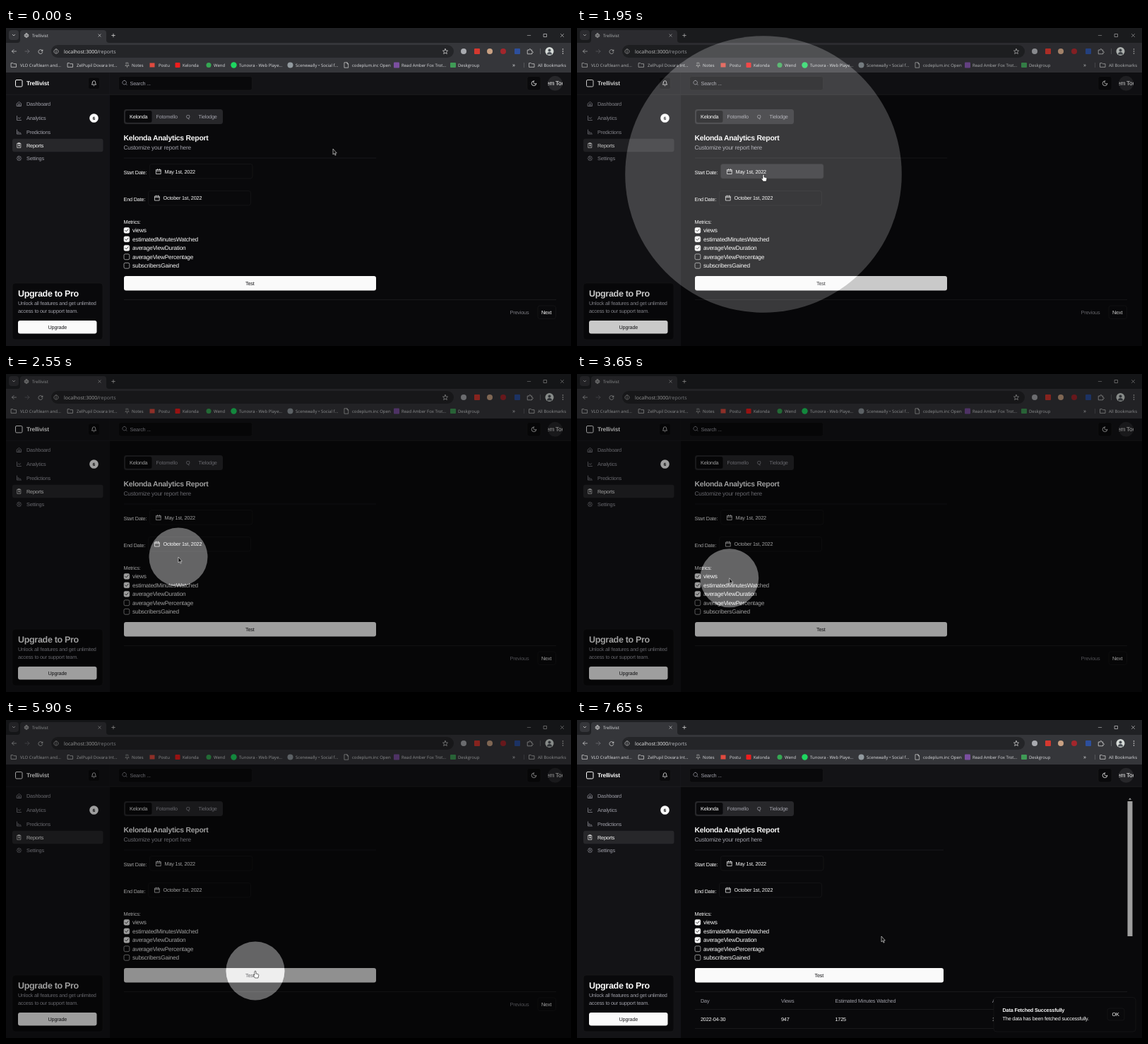
Recreate the animation shown at these times as an HTML page. Size 800 px wide and 450 px high, loop 8 s.

```html
<!DOCTYPE html>
<html lang="en">
<head>
<meta charset="utf-8">
<title>Reports</title>
<style>
html, body { margin: 0; width: 100%; height: 100%; overflow: hidden; background: #09090b; }
svg { display: block; width: 100vw; height: 100vh; }
text { font-family: "Liberation Sans", Arial, sans-serif; letter-spacing: -.025em; white-space: pre; text-rendering: geometricPrecision; }
.ui { font-family: "Open Sans", "Noto Sans", sans-serif; letter-spacing: 0; }
.b { font-weight: bold; }
</style>
</head>
<body>
<svg id="stage" viewBox="0 0 800 450"></svg>
<script>
const WHITE = '#fafafa', MUTED = '#a1a1aa', BG = '#09090b', PANEL = '#131316', HOVER = '#27272a', LINE = '#1b1b1e';
const SM = 7.29, MD = 8.33, LG = 10.42, XL = 12.5;

// Text is placed by its left edge and the middle of its capitals.
const text = (x, y, s, size = SM, fill = WHITE, cls = '') =>
  `<text x="${x}" y="${y + size * .36}" font-size="${size}" fill="${fill}" class="${cls}">${s}</text>`;
const ui = (x, y, s, size = 6, fill = '#dcdde0') => text(x, y, s, size, fill, 'ui');
const box = (x, y, w, h, fill, r = 0, more = '') =>
  `<rect x="${x}" y="${y}" width="${w}" height="${h}" rx="${r}" fill="${fill}" ${more}/>`;
const framed = (x, y, w, h, fill, r, id = '') => box(x, y, w, h, fill, r, `stroke="${LINE}" stroke-width=".6" id="${id}"`);
const dot = (x, y, r, fill) => `<circle cx="${x}" cy="${y}" r="${r}" fill="${fill}"/>`;
const icon = (x, y, size, d, color = WHITE, w = 2) =>
  `<path transform="translate(${x - size / 2} ${y - size / 2}) scale(${size / 24})" d="${d}" fill="none" stroke="${color}" stroke-width="${w}" stroke-linecap="round" stroke-linejoin="round"/>`;
const rule = (x1, y, x2, id = '') => `<path id="${id}" d="M${x1} ${y}H${x2}" stroke="#242427" stroke-width=".6"/>`;

const ICON = {
  home: 'M3 10l9-7 9 7v11H3zM9 21v-9h6v9',
  line: 'M3 3v18h18M19 9l-5 5-4-4-3 3',
  bars: 'M3 3v18h18M8 17v-7M13 17v-3M18 17v-1',
  clip: 'M5 4h14v18H5zM9 2h6v4H9zM12 10v6M9 13h6',
  gear: 'M12 9a3 3 0 1 0 .01 0M12 2l3 3h4v4l3 3-3 3v4h-4l-3 3-3-3H5v-4l-3-3 3-3V5h4z',
  bell: 'M6 8a6 6 0 0 1 12 0c0 7 3 9 3 9H3s3-2 3-9M10.3 21a2 2 0 0 0 3.4 0',
  moon: 'M12 3a6 6 0 0 0 9 9 9 9 0 1 1-9-9',
  search: 'M11 3a8 8 0 1 0 .01 0M21 21l-4.3-4.3',
  date: 'M3 5h18v17H3zM16 2v4M8 2v4M3 10h18',
  folder: 'M2 4h7l3 3h10v13H2z',
  globe: 'M12 2a10 10 0 1 0 .01 0M3 9h18M3 15h18M12 2c-6 6-6 14 0 20c6-6 6-14 0-20',
  star: 'M12 2l3 7 7 .5-5.500 5 2 7.500-6.500-4-6.500 4 2-7.500-5.500-5 7-.5z',
  info: 'M12 2a10 10 0 1 0 .01 0M12 11v6M12 7v.1',
  reload: 'M20 6v5h-5M20 11a8.500 8.500 0 1 0 0 5',
  back: 'M21 12H3M11 4l-8 8 8 8',
  next: 'M3 12h18M13 4l8 8-8 8',
  down: 'M5 9l7 7 7-7',
  cross: 'M4 4l16 16M20 4L4 20',
  plus: 'M12 3v18M3 12h18',
  minus: 'M3 12h18',
  square: 'M4 4h16v16H4z',
  puzzle: 'M3 7h6c-2-6 7-6 5 0h5v6c6-2 6 7 0 5v4H3z',
  pin: 'M8 2h8v8l4 5H4l4-5zM12 15v7',
  file: 'M4 1h11l5 6v16H4zM15 1v6h5',
  check: 'M4 12l6 6L20 6'
};

function browser() {
  const marks = [
    [20, 'VLO Craftlearn and...'], [100, 'ZelPupil Dovara Int...'], [178, 'Notes'], [216, 'Postu'],
    [250, 'Kelonda'], [294, 'Wend'], [330, 'Tunovra - Web Playe...'], [410, 'Scenewally • Social f...'],
    [490, 'codeplum.inc Open'], [560, 'Read Amber Fox Trot...'], [640, 'Deskgroup'], [753, 'All Bookmarks']
  ];
  const ext = [[648, '#a9abb0'], [685, '#c9a183'], [704, '#a3262c']];
  return box(0, 0, 800, 63, '#35363a') + box(0, 0, 800, 21, '#202124') +
    box(4, 3, 14, 14, '#35363a', 4) + icon(11, 10, 6, ICON.down, '#ddd', 3) +
    '<path d="M16 21q4 0 4-4V7q0-4 4-4H138q4 0 4 4V17q0 4 4 4z" fill="#35363a"/>' +
    icon(29, 10.5, 7, ICON.globe, '#ddd') + ui(37, 10.5, 'Trellivist') +
    icon(132.500, 10.5, 5, ICON.cross, '#ddd', 3) + icon(152, 10.5, 6, ICON.plus, '#ddd', 3) +
    icon(740.500, 10.5, 6, ICON.minus, '#ddd') + icon(763.500, 10.5, 6, ICON.square, '#ddd', 2.500) + icon(787.500, 10.5, 6, ICON.cross, '#ddd', 2.500) +
    icon(11.500, 33, 8, ICON.back, '#ddd') + icon(30, 33, 8, ICON.next, '#77787c') + icon(49, 33, 8.500, ICON.reload, '#ddd') +
    box(64, 24, 570, 18, '#242528', 9) + icon(71, 33, 7.500, ICON.info, '#ddd') +
    ui(82, 33, 'localhost:3000/<tspan fill="#b9bbc0">reports</tspan>', 7, '#eee') + icon(622, 33, 8.500, ICON.star, '#ddd') +
    ext.map(e => dot(e[0], 33, 4, e[1])).join('') + box(663, 29, 8, 8, '#d4382f', 1) + box(720, 29, 8, 8, '#2d4f9c', 1) +
    icon(742, 33, 9, ICON.puzzle, '#ddd') + box(756, 29, .7, 8, '#6b6d72') +
    dot(769.500, 33, 6, '#d6dbd8') + dot(769.500, 31.500, 2, '#4a4f55') + '<path d="M766 37.500a3.500 3.500 0 0 1 7 0z" fill="#4a4f55"/>' +
    [30, 33, 36].map(y => dot(788.500, y, .8, '#ddd')).join('') +
    marks.map(m => ui(m[0], 52.500, m[1])).join('') +
    [11, 91, 744.500].map(x => icon(x, 52.500, 8.500, ICON.folder, '#ddd')).join('') +
    icon(171.500, 52.500, 8, ICON.pin, '#aaa') + icon(482, 52.500, 8, ICON.file, '#ddd') +
    box(203.500, 49.500, 7, 6, '#e04a3f') + box(239.500, 49, 7, 7, '#f01d1d', 1) + dot(287, 52.500, 3.500, '#35a853') +
    dot(322.500, 52.500, 4.200, '#1ed760') + dot(402.500, 52.500, 4, '#929a9f') + box(549, 48.500, 8, 8, '#7b4fa0', 1) +
    box(629, 49, 8, 7, '#3f9b56', 1) + ui(717, 52, '»', 8) + box(733, 49, .6, 7, '#6b6d72');
}

function sidebar() {
  const items = [[107.500, 'Dashboard', 'home'], [127.500, 'Analytics', 'line'], [147, 'Predictions', 'bars'],
    [166, 'Reports', 'clip'], [184.500, 'Settings', 'gear']];
  return box(0, 63, 800, 31.500, PANEL) + box(0, 94, 146.500, 356, PANEL) +
    rule(0, 94.300, 800) + box(146.300, 63, .5, 387, LINE) +
    box(13.500, 73.500, 9.500, 9.500, 'none', 1.500, `stroke="${WHITE}" stroke-width="1"`) +
    text(29, 78.500, 'Trellivist', MD, WHITE, 'b') +
    framed(116.500, 70, 16, 16.500, BG, 3) + icon(124.500, 78.300, 8.500, ICON.bell) +
    framed(159.500, 68.500, 189, 19.500, BG, 3) + icon(168, 77.500, 8.500, ICON.search, MUTED) + text(175.500, 78.200, 'Search ...', SM, MUTED) +
    framed(738, 68.500, 19, 19.500, BG, 3) + icon(747.500, 78.300, 9, ICON.moon) +
    dot(777.500, 78.300, 10.500, HOVER) +
    '<clipPath id="face"><circle cx="777.5" cy="78.3" r="10.5"/></clipPath><g clip-path="url(#face)">' + text(765, 78.500, 'em Tor', MD) + '</g>' +
    box(9, 156.800, 128.500, 18.500, HOVER, 3) +
    items.map(([y, s, i]) => {
      const color = s === 'Reports' ? WHITE : MUTED;
      return icon(18.500, y, 8, ICON[i], color) + text(29, y, s, SM, color);
    }).join('') +
    dot(124.500, 127.500, 6.300, WHITE) + text(122.800, 127.500, '6', 6.250, BG, 'b') +
    framed(9, 361, 128, 80, BG, 4) + text(17, 375.500, 'Upgrade to Pro', XL, WHITE, 'b') +
    text(17, 389.800, 'Unlock all features and get unlimited', SM, MUTED) + text(17, 400.200, 'access to our support team.', SM, MUTED) +
    box(17, 414, 111.500, 18.500, WHITE, 3) + text(59.500, 423, 'Upgrade', SM, '#18181b');
}

function report() {
  const metrics = ['views', 'estimatedMinutesWatched', 'averageViewDuration', 'averageViewPercentage', 'subscribersGained'];
  return box(167, 115, 140, 21, HOVER, 3.500) + box(169, 117, 37.500, 16.800, BG, 2.500) +
    text(175, 125.500, 'Kelonda') + text(212.500, 125.500, 'Fotomello', SM, MUTED) +
    text(255, 125.500, 'Q', SM, MUTED) + text(272.500, 125.500, 'Tielodge', SM, MUTED) +
    text(166.500, 155.500, 'Kelonda Analytics Report', LG, WHITE, 'b') + text(166.500, 169.500, 'Customize your report here', MD, MUTED) +
    rule(167, 184, 524, 'divider') +
    text(166.500, 204.500, 'Start Date:') + framed(203.500, 192.500, 145.500, 20.500, BG, 3, 'start') + icon(216, 203, 8.500, ICON.date) + text(224.500, 203.200, 'May 1st, 2022') +
    text(166.500, 242, 'End Date:') + framed(201.500, 230.500, 145, 20.500, BG, 3, 'end') + icon(214, 240.500, 8.500, ICON.date) + text(222.500, 240.700, 'October 1st, 2022') +
    text(166.500, 274, 'Metrics:') +
    metrics.map((s, i) => {
      const y = 286.300 + i * 12.500, on = i < 3;
      return box(167, y - 3.900, 7.800, 7.800, on ? WHITE : BG, 1.800, `stroke="${WHITE}" stroke-width=".55"`) +
        (on ? icon(170.900, y, 6.500, ICON.check, BG, 2.800) : '') + text(179, y, s, MD);
    }).join('') +
    box(167, 351, 357, 20.500, WHITE, 3, 'id="test"') + '<g id="label">' + text(339, 361.300, 'Test', SM, '#18181b') + '</g>' +
    rule(167, 384.500, 779) +
    '<g id="pager">' + text(713.500, 402.500, 'Previous', SM, '#7d7d84') + framed(753, 393, 25.500, 18.500, BG, 3) + text(758, 402.500, 'Next') + '</g>' +
    '<g id="table">' + [[175, 'Day'], [289, 'Views'], [365.500, 'Estimated Minutes Watched'], [588, 'Average View Duration']].map(c => text(c[0], 397, c[1], SM, MUTED)).join('') +
    rule(167, 409.500, 774) + [[175, '2022-04-30'], [289, '947'], [365.500, '1725'], [588, '194']].map(c => text(c[0], 423, c[1])).join('') + rule(167, 436.500, 774) +
    '<path d="M781 112.800l2-2.500 2 2.500z" fill="#9f9f9f"/>' + box(779.500, 115, 7, 191, '#9f9f9f') + '</g>' +
    '<g id="toast">' + framed(590, 392.500, 201, 48.500, BG, 4) + text(602.500, 410.500, 'Data Fetched Successfully', SM, WHITE, 'b') +
    text(602.500, 422.800, 'The data has been fetched successfully.') + framed(751, 408, 24, 17, BG, 3) + text(757.500, 416.800, 'OK') + '</g>';
}

const stage = document.getElementById('stage');
stage.innerHTML = box(0, 0, 800, 450, BG) + report() + sidebar() + browser() +
  '<path id="shade" fill="#000" fill-rule="evenodd"/><circle id="spot" fill="#fff"/><g id="cursor">' +
  '<path id="arrow" d="M0 0V8l1.800-1.600 1.200 2.800 1.200-.5-1.200-2.700H5.300z" fill="#111" stroke="#eee" stroke-width=".6"/>' +
  '<path id="hand" d="M-1 .8q1-1.600 2 0V4l3.200.8q.8.300.600 1.500L4 10H-.5L-3 6.200q.3-1.200 2 0z" fill="#fff" stroke="#111" stroke-width=".6"/></g>';

const $ = id => document.getElementById(id);
const set = (id, attrs) => { for (const k in attrs) $(id).setAttribute(k, attrs[k]); };
const show = (id, on) => set(id, { visibility: on ? 'visible' : 'hidden' });
const clamp = v => Math.max(0, Math.min(1, v));
const ease = (t, start, span) => 1 - (1 - clamp((t - start) / span)) ** 3;

// time, x, y
const path = [
  [0, 463, 171], [300, 400, 150], [650, 262, 209], [850, 245, 204], [1400, 245, 204], [1600, 264, 207],
  [1950, 264, 207], [2550, 244, 259], [2700, 243, 256], [2950, 243, 245], [3200, 243, 245],
  [3700, 215, 290], [4050, 196, 310], [4250, 208, 318], [4500, 208, 318], [4850, 212, 311], [5350, 208, 313],
  [5900, 353, 355], [6100, 348, 363], [7100, 348, 363], [7650, 431, 306], [8000, 431, 306]
];
const targets = [['start', 203, 192, 146, 21, BG, HOVER], ['end', 201, 230, 146, 21, BG, HOVER], ['test', 167, 351, 357, 20, WHITE, '#e3e3e4']];

function pointer(t) {
  const i = path.findIndex(p => p[0] > t), a = path[i - 1], b = path[i];
  let k = (t - a[0]) / (b[0] - a[0]);
  k = k * k * (3 - 2 * k);
  return [a[1] + (b[1] - a[1]) * k, a[2] + (b[2] - a[2]) * k];
}

function draw() {
  const t = performance.now() % 8000, [x, y] = pointer(t);
  let hand = false;
  for (const [id, l, top, w, h, idle, lit] of targets) {
    const over = x > l && x < l + w && y > top && y < top + h;
    hand = hand || over;
    set(id, { fill: over ? lit : idle });
  }
  set('cursor', { transform: `translate(${x} ${y})` });
  show('arrow', !hand);
  show('hand', hand);

  const focus = ease(t, 1861, 400) - ease(t, 6280, 400), r = 373 - 331.500 * focus;
  set('shade', { d: `M0 0H800V450H0zM${x - r} ${y}a${r} ${r} 0 1 0 ${2 * r} 0a${r} ${r} 0 1 0 ${-2 * r} 0`, opacity: .37 * focus });
  set('spot', { cx: x, cy: y, r, opacity: .37 * focus });

  const loaded = t >= 7300, right = loaded ? 519 : 524;
  set('divider', { d: `M167 184H${right}` });
  set('test', { width: right - 167 });
  set('label', { transform: `translate(${loaded ? -2.5 : 0})` });
  show('pager', !loaded);
  show('table', loaded);
  show('toast', loaded);
  set('toast', { transform: `translate(0 ${60 * (1 - ease(t, 7350, 200))})` });
  requestAnimationFrame(draw);
}
draw();
</script>
</body>
</html>
```
